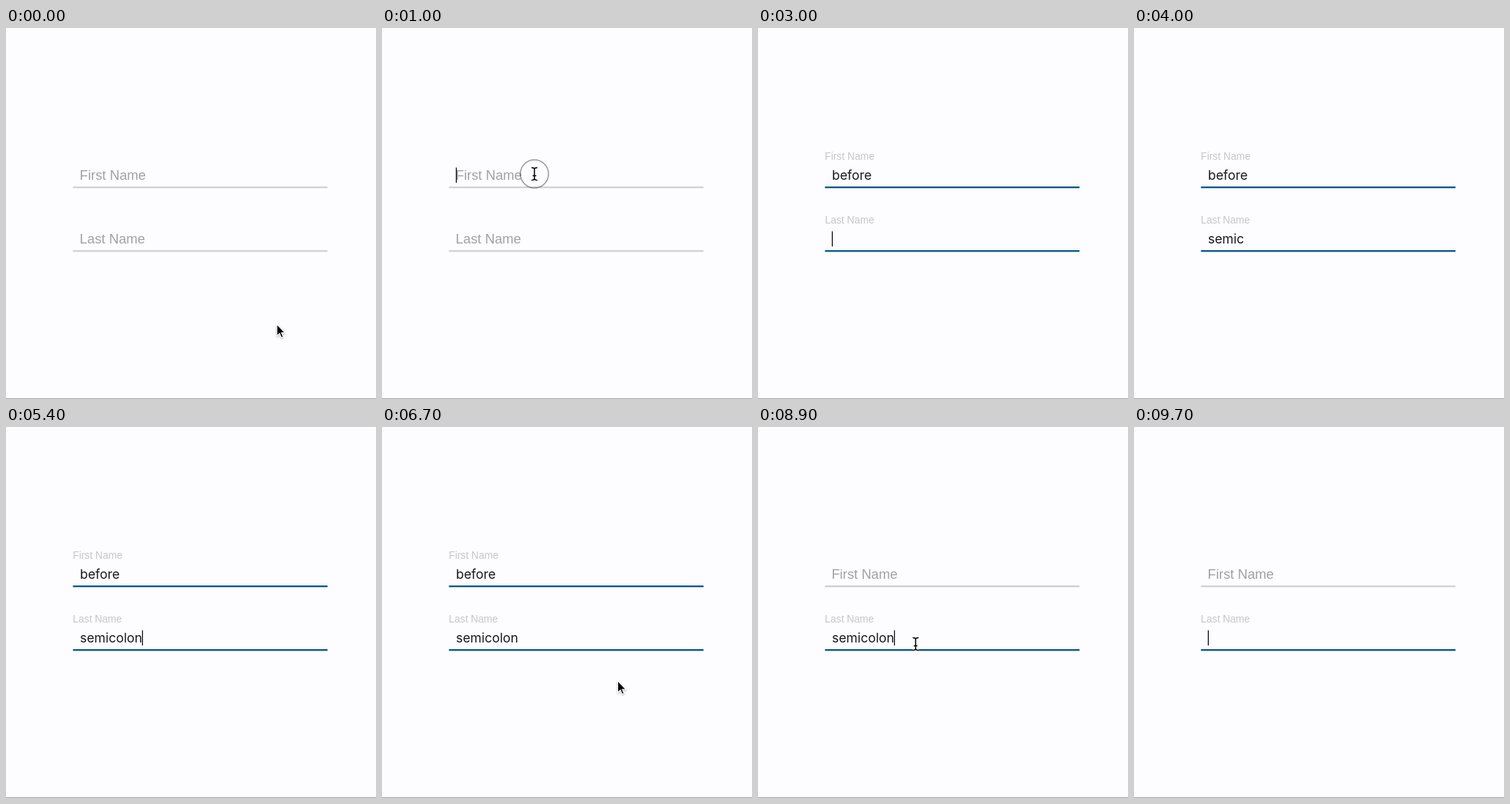
An HTML page that plays this animation: 500 px wide and 501 px high, repeating every 10 s.

```html
<!DOCTYPE html>
<html lang="en">
<head>
<meta charset="utf-8">
<title>Floating labels</title>
<style>
  html, body { margin: 0; width: 100%; height: 100%; overflow: hidden; background: #fdfcff; }
  svg { display: block; width: 500px; height: 501px; }
  .label { font: 18.3px "Liberation Sans", Arial, sans-serif; }
  .value { font: 17.4px Inter, sans-serif; fill: #18181b; white-space: pre; }
  .sel { fill: #a8d0fb; }
  .caret { fill: #000; }
</style>
</head>
<body>
<svg viewBox="0 0 500 501">
  <g id="fields"></g>
  <rect y="500" width="500" height="1" fill="#a3a2a5"/>
  <circle id="ring" fill="none" stroke="#000" stroke-opacity=".4" stroke-width="1.5"/>
  <g id="mouse">
    <path id="arrow" d="M0 0V16L3.7 12.6L6.1 18.2L8.7 17.1L6.3 11.6H11.2Z" fill="#000" stroke="#fff" stroke-width="1.2"
      style="filter: drop-shadow(0 1px 1px rgba(0,0,0,.3))"/>
    <g id="beam" fill="none">
      <path id="bar" d="M-4 -8.5Q0 -8.5 0 -6Q0 -8.5 4 -8.5M0 -6V6M-4 8.5Q0 8.5 0 6Q0 8.5 4 8.5M-2.5 2.5H2.5" stroke="#fff" stroke-width="3.6"/>
      <use href="#bar"/>
      <path d="M-4 -8.5Q0 -8.5 0 -6Q0 -8.5 4 -8.5M0 -6V6M-4 8.5Q0 8.5 0 6Q0 8.5 4 8.5M-2.5 2.5H2.5" stroke="#000" stroke-width="1.5"/>
    </g>
  </g>
</svg>
<script>
const LOOP = 10000, STEP = 100;
const $ = id => document.getElementById(id);
const clamp = v => Math.max(0, Math.min(1, v));
const mix = (a, b, p) => a + (b - a) * p;
const mixRgb = (a, b, p) => `rgb(${a.map((v, i) => Math.round(mix(v, b[i], p)))})`;
const within = (t, spans) => spans.some(([a, b]) => t >= a && t < b);
// last entry that has started: [time, ...data]
const latest = (t, list) => list.filter(e => e[0] <= t).pop();

// CSS "ease" curve
function ease(x) {
  const bez = (a, b, s) => 3 * (1 - s) ** 2 * s * a + 3 * (1 - s) * s * s * b + s ** 3;
  let lo = 0, hi = 1;
  for (let i = 0; i < 20; i++) {
    const mid = (lo + hi) / 2;
    if (bez(.25, .25, mid) < x) lo = mid; else hi = mid;
  }
  return bez(.1, 1, lo);
}
const ramp = (t, start) => ease(clamp((t - start) / 300));

const fields = [
  {
    name: "First Name", y: 185,
    lift: t => ramp(t, 1050) - ramp(t, 8650),
    typed: [[0, ""], [1800, "b"], [1900, "be"], [2100, "bef"], [2200, "befo"], [2400, "befor"], [2500, "before"], [7800, ""]],
    caretOn: [[1000, 1600], [1800, 2800], [7200, 7600], [7800, 8300]],
    selected: [[7600, 7800]]
  },
  {
    name: "Last Name", y: 271,
    lift: t => ramp(t, 2750),
    typed: [[0, ""], [3200, "s"], [3400, "sem"], [3500, "semi"], [3700, "semic"], [4500, "semico"], [4600, "semicol"],
      [5200, "semicolo"], [5400, "semicolon"], [9600, ""]],
    caretOn: [[2800, 4000], [4300, 5100], [5200, 5900], [8600, 9200], [9600, LOOP]],
    selected: [[9400, 9600]]
  }
];

// pointer strokes: [start, end, from x, from y, to x, to y]
const moves = [
  [0, 1, 366, 400, 366, 400],
  [430, 800, 366, 400, 206, 197],
  [5820, 6300, 206, 197, 329, 354],
  [6620, 7100, 329, 354, 187, 201],
  [8130, 8550, 187, 201, 213, 293]
];
const hidden = [[1800, 5900], [7700, 8200], [9500, LOOP]];
const clicks = [[100, 200], [1000, 1100], [6400, 6500], [7200, 7300], [8600, 8700]];

function add(tag, cls, attrs) {
  const el = document.createElementNS("http://www.w3.org/2000/svg", tag);
  el.setAttribute("class", cls);
  set(el, attrs);
  return $("fields").appendChild(el);
}
function set(el, attrs) {
  for (const k in attrs) el.setAttribute(k, attrs[k]);
}
const show = (el, on) => { el.style.display = on ? "" : "none"; };

for (const f of fields) {
  f.line = add("rect", "line", { x: 90.5, y: f.y + 29, width: 344, height: 2.3 });
  f.sel = add("rect", "sel", { x: 100, y: f.y + 3, height: 21 });
  f.label = add("text", "label", {});
  f.label.textContent = f.name;
  f.value = add("text", "value", { x: 100, y: f.y + 20 });
  f.caret = add("rect", "caret", { y: f.y + 3.5, width: 1.2, height: 20.5 });
}

function drawField(f, t) {
  const p = f.lift(t);
  set(f.line, { fill: mixRgb([210, 209, 212], [8, 88, 138], p) });
  set(f.label, {
    fill: mixRgb([161, 160, 163], [198, 197, 200], p),
    transform: `translate(${mix(99.6, 90.3, p)} ${f.y + mix(20.4, -7, p)}) scale(${mix(1, .75, p)})`
  });
  f.value.textContent = latest(t, f.typed)[1];
  const w = f.value.textContent ? f.value.getComputedTextLength() : 0;
  set(f.sel, { width: w });
  show(f.sel, within(t, f.selected));
  set(f.caret, { x: 99.8 + w });
  show(f.caret, within(t, f.caretOn));
}

function drawMouse(t) {
  const [a, b, x0, y0, x1, y1] = latest(t, moves);
  const u = clamp((t - a) / (b - a)), p = u * u * (3 - 2 * u);
  const x = mix(x0, x1, p), y = mix(y0, y1, p);
  const inField = x > 91 && x < 435 && fields.some(f => y > f.y && y < f.y + 31);
  set($("mouse"), { transform: `translate(${x} ${y})` });
  show($("mouse"), !within(t, hidden));
  show($("arrow"), !inField);
  show($("beam"), inField);
  set($("ring"), { cx: x, cy: y, r: inField ? 19 : 25 });
  show($("ring"), within(t, clicks));
}

function frame(now) {
  const t = Math.floor(now % LOOP / STEP) * STEP;
  fields.forEach(f => drawField(f, t));
  drawMouse(t);
  requestAnimationFrame(frame);
}
frame(0);
</script>
</body>
</html>
```
